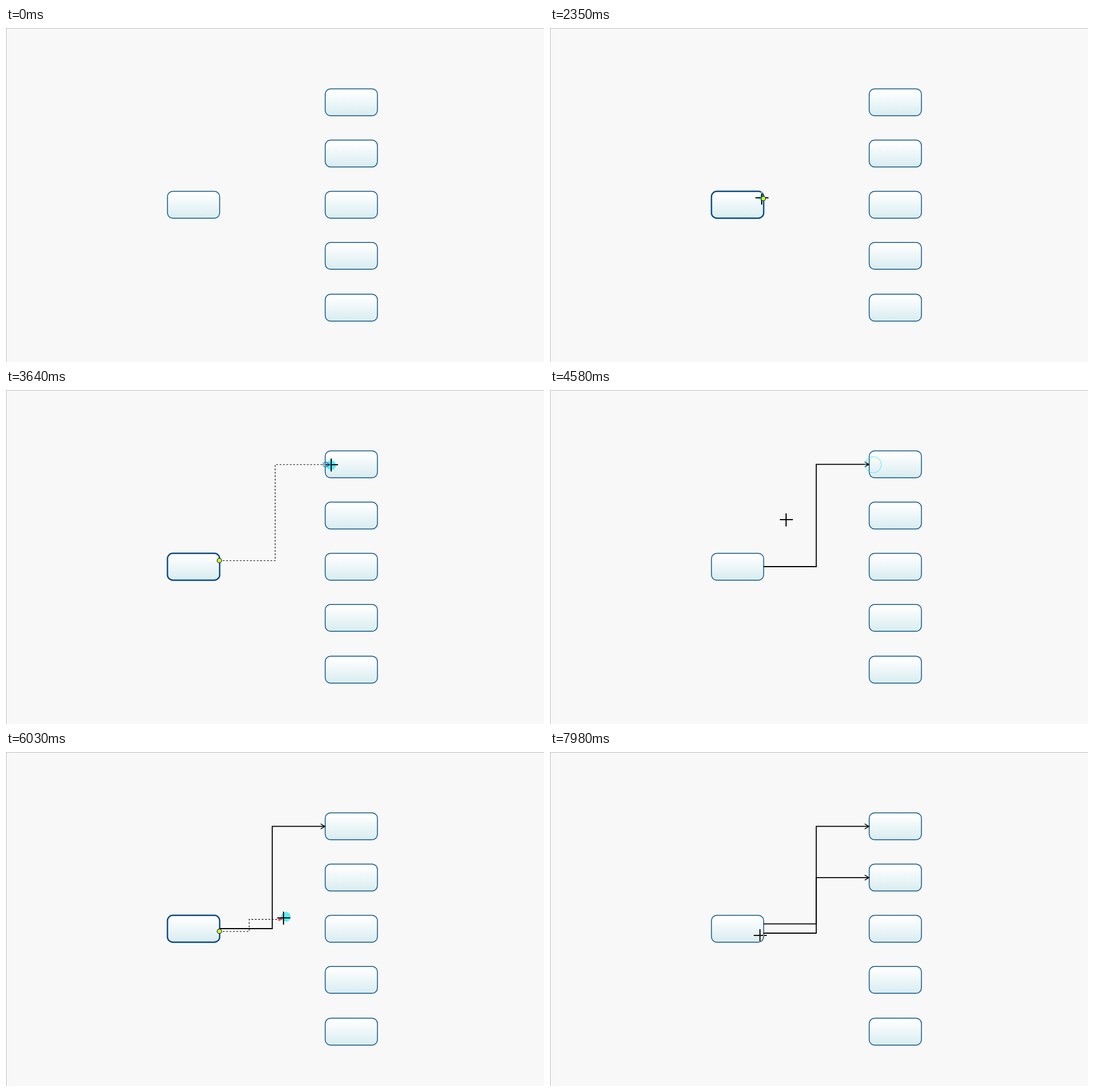
Write an HTML page with a canvas that moves like this. It is 948x590 px and loops after 8000 ms.

```html
<!DOCTYPE html>
<html lang="en">
<head>
<meta charset="utf-8">
<title>Connecting boxes</title>
<style>
html, body { margin: 0; width: 100%; height: 100%; overflow: hidden; background: #f8f8f8; }
canvas { display: block; }
</style>
</head>
<body>
<canvas id="stage" width="948" height="590"></canvas>
<script>
const ctx = document.getElementById('stage').getContext('2d');
const LOOP = 8000;
const BOX = { w: 92, h: 47.5, r: 9.5 };
const SOURCE = { x: 284.5, y: 288.5 };
const TARGET_X = 562.5;
const TARGET_Y = [107.5, 198, 288.5, 378.8, 470.2];
const OUT_X = 376;

// Pointer path: time, x, y
const PATH = [
  [830, 223, 18], [1040, 330, 110], [1220, 432, 270], [1340, 415, 333], [1520, 368, 307],
  [1670, 368, 307], [1840, 373, 300.5], [2350, 373, 300.5],
  [2680, 440, 228], [2990, 530, 158], [3170, 546, 144], [3400, 565, 122], [3680, 573, 133],
  [3990, 573, 133], [4150, 569.5, 132], [4370, 569.5, 132],
  [4580, 416, 229], [4880, 366, 331], [5180, 372, 315], [5420, 372, 315],
  [5780, 420, 310], [6030, 489, 293.6], [6210, 531, 241], [6500, 560, 221], [6770, 567.5, 218],
  [7190, 567.5, 218], [7350, 569.5, 217.5], [7540, 569.5, 217.5],
  [7680, 480, 290], [7840, 385, 358], [7980, 370, 324], [8000, 370, 324]
];

const DRAGS = [
  { down: 2350, up: 4370, y: 301.5, target: 0 },
  { down: 5420, up: 7540, y: 317, target: 1 }
];

const clamp = (v, lo, hi) => Math.max(lo, Math.min(hi, v));

function slope(i, k) {
  const a = PATH[i - 1], b = PATH[i], c = PATH[i + 1];
  if (!a || !c) return 0;
  const p = (b[k] - a[k]) / (b[0] - a[0]);
  const q = (c[k] - b[k]) / (c[0] - b[0]);
  return p * q <= 0 ? 0 : 2 * p * q / (p + q);
}

// Monotone cubic interpolation, so that rests stay still
function pointer(t) {
  t = clamp(t, PATH[0][0], LOOP);
  let i = 0;
  while (i < PATH.length - 2 && PATH[i + 1][0] <= t) i++;
  const a = PATH[i], b = PATH[i + 1], d = b[0] - a[0], u = (t - a[0]) / d;
  const axis = k =>
    a[k] * (1 + 2 * u) * (1 - u) ** 2 + b[k] * u * u * (3 - 2 * u) +
    d * (slope(i, k) * u * (1 - u) ** 2 + slope(i + 1, k) * u * u * (u - 1));
  return { x: axis(1), y: axis(2) };
}

function box(x, y, active) {
  const fill = ctx.createLinearGradient(0, y, 0, y + BOX.h);
  fill.addColorStop(0.08, '#ffffff');
  fill.addColorStop(1, '#d8ecf0');
  ctx.beginPath();
  ctx.roundRect(x, y, BOX.w, BOX.h, BOX.r);
  ctx.fillStyle = fill;
  ctx.fill();
  ctx.strokeStyle = active ? '#074a82' : '#0b5689';
  ctx.lineWidth = active ? 2.4 : 1.5;
  ctx.stroke();
}

function line(points, color, width) {
  ctx.beginPath();
  points.forEach(([x, y]) => ctx.lineTo(x, y));
  ctx.strokeStyle = color;
  ctx.lineWidth = width;
  ctx.stroke();
}

function disc(x, y, r, fill, stroke, width) {
  ctx.beginPath();
  ctx.arc(x, y, r, 0, Math.PI * 2);
  if (fill) { ctx.fillStyle = fill; ctx.fill(); }
  if (stroke) { ctx.strokeStyle = stroke; ctx.lineWidth = width; ctx.stroke(); }
}

const elbow = (y0, mid, x1, y1) => [[OUT_X, y0], [mid, y0], [mid, y1], [x1, y1]];

function openHead(x, y, color) {
  line([[x - 8, y - 4.5], [x - 0.5, y], [x - 8, y + 4.5]], color, 1.4);
}

function connector(y0, target) {
  const y1 = TARGET_Y[target] + 23.9;
  line(elbow(y0, 469.2, 562, y1), '#000', 1.8);
  openHead(562.5, y1, '#000');
}

function rubberBand(drag, end) {
  const over = end.x > 562;
  const mid = (OUT_X + end.x - (over ? 0 : 3)) / 2;
  ctx.setLineDash([3, 3]);
  line(elbow(drag.y, mid, over ? 562 : end.x - 3, end.y), '#000', 1.2);
  ctx.setLineDash([]);
}

function dragMarks(drag, end) {
  disc(OUT_X, drag.y - 0.3, 3.9, '#f4f400', '#0b5060', 1.4);
  if (end.x > 562) {
    disc(562.5, end.y, 4, null, '#1583b0', 1.3);
    openHead(572, end.y, '#2a78e0');
  } else if (end.x > OUT_X + 12) {
    ctx.fillStyle = 'rgba(226, 20, 45, 0.8)';
    ctx.beginPath();
    ctx.moveTo(end.x - 4, end.y - 3.2);
    ctx.lineTo(end.x + 4, end.y);
    ctx.lineTo(end.x - 4, end.y + 3.2);
    ctx.fill();
  }
}

function cross(p) {
  const x = Math.round(p.x), y = Math.round(p.y);
  ctx.globalCompositeOperation = 'difference';
  ctx.fillStyle = '#fff';
  ctx.beginPath();
  ctx.rect(x - 1, y - 11, 2, 23);
  ctx.rect(x - 11, y - 1, 23, 2);
  ctx.fill();
  ctx.globalCompositeOperation = 'source-over';
}

function pressSpot(p, age) {
  ctx.globalCompositeOperation = 'multiply';
  disc(p.x, p.y, clamp(5 + age / 25, 5, 8.5), '#5af6ff');
  ctx.globalCompositeOperation = 'source-over';
}

function releaseRing(drag, age) {
  const p = pointer(drag.up), u = clamp(age / 200, 0, 1);
  ctx.globalAlpha = 1 - 0.3 * u;
  disc(p.x, p.y, 8.5 + 5.7 * u, null, '#4feaf4', 1.3);
  ctx.globalAlpha = 1;
}

function draw(t) {
  const drag = DRAGS.find(d => t >= d.down && t < d.up);
  const done = DRAGS.filter(d => t >= d.up);
  const end = pointer(drag ? Math.max(t - 20, drag.down) : t);

  ctx.fillStyle = '#f8f8f8';
  ctx.fillRect(0, 0, 948, 590);
  ctx.fillStyle = '#bdbdbd';
  ctx.fillRect(0, 0, 948, 1);
  ctx.fillRect(0, 0, 1, 590);

  box(SOURCE.x, SOURCE.y, drag);
  TARGET_Y.forEach(y => box(TARGET_X, y, false));

  const ports = done.length > 1 ? [303.7, 320] : [312];
  done.forEach((d, i) => connector(ports[i], d.target));

  if (drag) rubberBand(drag, end);
  if (t >= PATH[0][0]) cross(pointer(t));
  if (drag) {
    pressSpot(pointer(t + 15), t - drag.down);
    dragMarks(drag, end);
  }
  for (const d of done) if (t - d.up < 250) releaseRing(d, t - d.up);
}

const start = performance.now();
function tick() {
  draw((performance.now() - start) % LOOP);
  requestAnimationFrame(tick);
}
tick();
</script>
</body>
</html>
```
